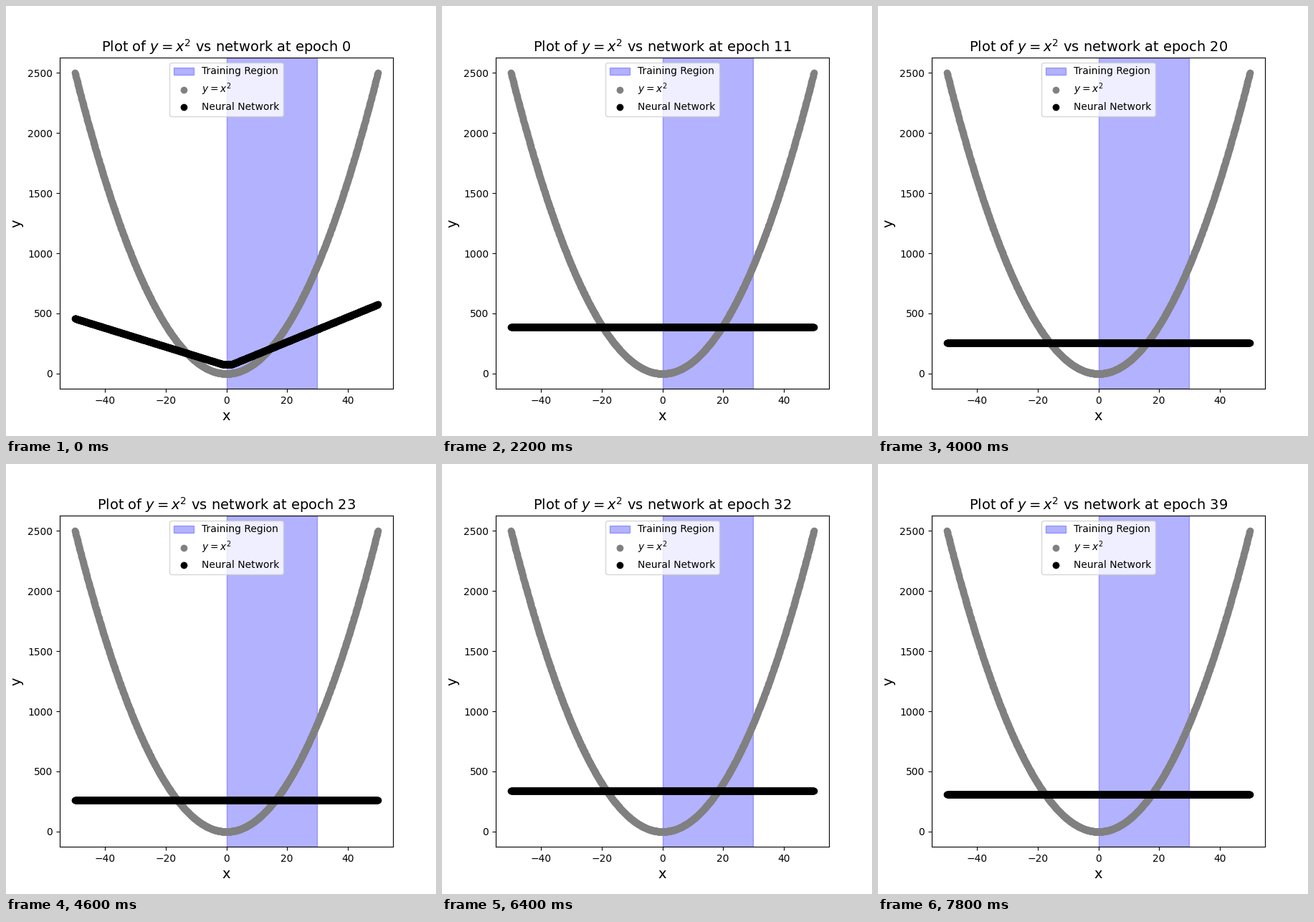
Recreate the animation shown at these times as a matplotlib script. Size 600 by 600 pixels, loop 8 s.

```python
import numpy as np
import matplotlib.pyplot as plt
from matplotlib.animation import FuncAnimation

EPOCHS = 40
STEP_MS = 200

# Height of the flat part of the network's output, by epoch
KNOTS = [0, 5, 11, 16, 17, 23, 32, 34, 36, 39]
LEVELS = [80, 225, 385, 249, 255, 262, 340, 255, 261, 308]

x = np.linspace(-50, 50, 1000)


def network(epoch):
    """Two-sided ramp whose slopes die out while its level drifts."""
    level = np.interp(epoch, KNOTS, LEVELS)
    left = 7.79 * 0.6 ** epoch * np.maximum(-1.5 - x, 0)
    right = 10.31 * 0.483 ** epoch * np.maximum(x - 2, 0)
    return level + left + right


def title_text(epoch):
    return f"Plot of $y=x^2$ vs network at epoch {epoch}"


fig, ax = plt.subplots(figsize=(6, 6), dpi=100)
ax.axvspan(0, 30, color="blue", alpha=0.3, label="Training Region")
ax.scatter(x, x ** 2, color="gray", label="$y=x^2$")
output = ax.scatter(x, network(0), color="black", label="Neural Network")
ax.set_xlim(-55, 55)
ax.set_ylim(-125, 2625)
ax.set_xlabel("x", fontsize=14)
ax.set_ylabel("y", fontsize=14)
title = ax.set_title(title_text(0), fontsize=14)
ax.legend(loc="upper center")


def update(epoch):
    output.set_offsets(np.column_stack([x, network(epoch)]))
    title.set_text(title_text(epoch))
    return output, title


anim = FuncAnimation(fig, update, frames=EPOCHS, interval=STEP_MS, repeat=True)
plt.show()
```
